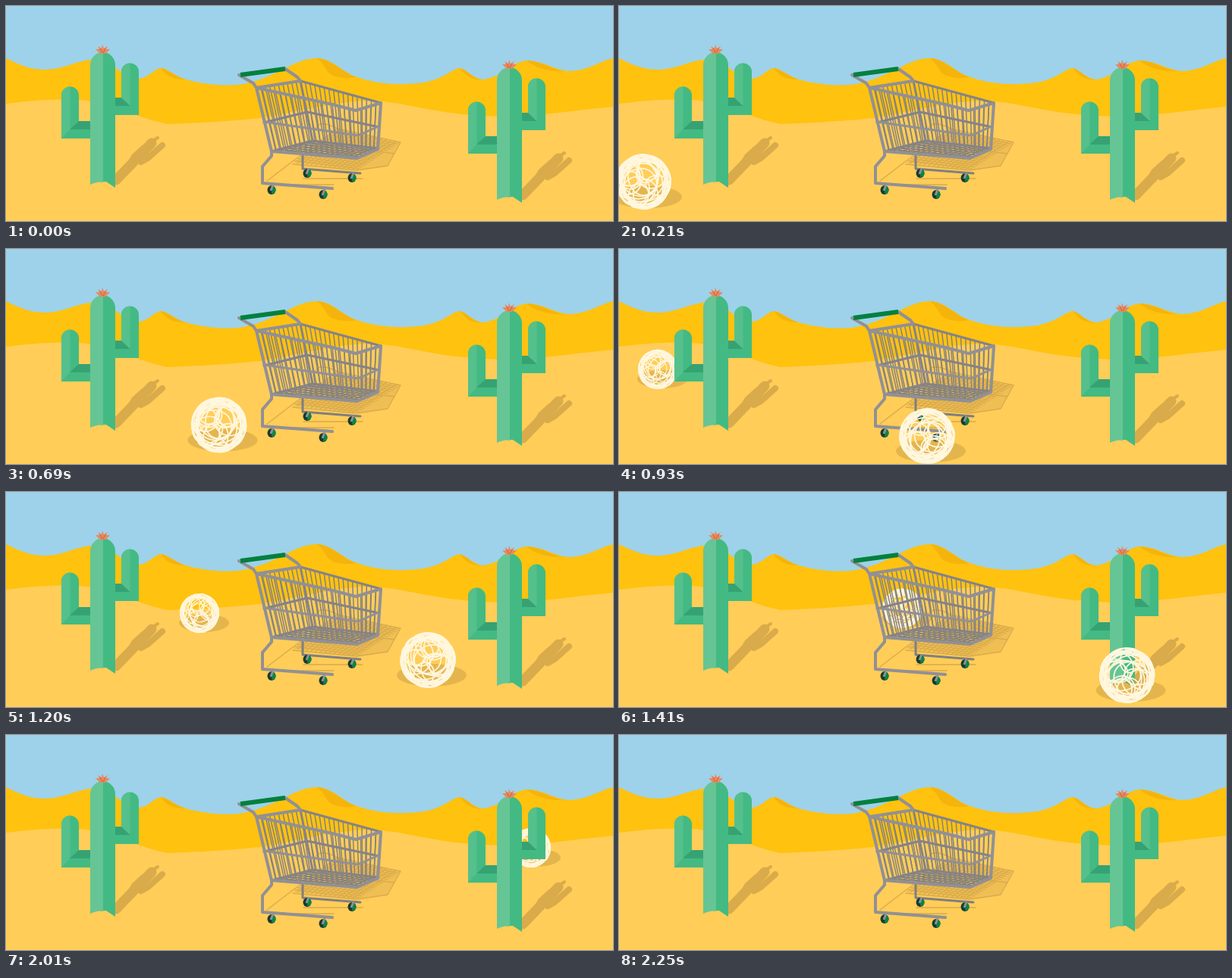
Animation, 800 px wide and 284 px high, one loop 2.34 s. Source, as an HTML page:

```html
<!DOCTYPE html>
<html lang="en">
<head>
<meta charset="utf-8">
<title>Desert cart</title>
<style>
  html, body { margin: 0; width: 100%; height: 100%; overflow: hidden; background: #ffcd58; }
  svg { display: block; width: 800px; height: 284px; }
  path { stroke-linejoin: round; }
  .line { fill: none; stroke: #919095; stroke-width: 4; stroke-linecap: round; }
  .shade { fill: #f5b40b; }
  .shadow { fill: none; stroke: #d9ab4b; stroke-linecap: round; stroke-linejoin: round; }
</style>
</head>
<body>
<svg viewBox="0 0 800 284">
  <defs>
    <g id="cactus">
      <g class="shadow">
        <path stroke-width="13" d="M145 230L192 181"/>
        <path stroke-width="8" d="M163 210L169 199L181 188M178 206L187 201L206 184"/>
        <path stroke-width="4" d="M194 178L200 174"/>
      </g>
      <path fill="#43ba83" d="M73 175V118a11.5 11.5 0 0 1 23 0V152H111V175ZM144 121H152V87a11.5 11.5 0 0 1 23 0V144H144Z"/>
      <path fill="#36a273" d="M84 163L96 152H111V163ZM144 121H152L164 132H144Z"/>
      <path fill="#55c08c" d="M73 175V118a11.5 11.5 0 0 1 11.5 -11.5V163L73 175ZM152 121V87a11.5 11.5 0 0 1 11.5 -11.5V132Z"/>
      <path fill="#43ba83" d="M127 61a17 17 0 0 1 17 17V240L132 232H127Z"/>
      <path fill="#66c594" d="M128 61a17 17 0 0 0 -17 17V236Q121 231 128 233Z"/>
      <path fill="#e8895f" d="M124 63L118 57L123 57L121 53L126 56L127 51L129 56L134 53L132 57L137 57L131 63Z"/>
      <path fill="none" stroke="#c8643f" d="M127 62L124 56M128 62L131 56"/>
    </g>
    <g id="scribble" fill="none" stroke="#fff7df" stroke-width="1.7"></g>
  </defs>

  <rect width="800" height="284" fill="#9dd2ea"/>
  <path fill="#ffc20e" d="M0 69C22 80 35 84 52 84C80 83 92 71 122 70C140 72 155 96 174 96C187 96 195 83 204 82C213 82 225 94 237 97C258 103 285 106 306 104C352 98 378 70 408 69C428 68 442 86 460 93C490 104 522 105 550 101C577 97 587 83 598 82C608 84 615 96 630 97C655 93 668 72 688 72C710 73 725 86 745 86C770 84 782 73 800 69V284H0Z"/>
  <path class="shade" d="M204 82C212 83 225 94 237 97C222 97 212 94 204 82ZM410 69C428 69 442 87 462 94C446 97 430 94 424 87C420 80 417 75 410 69ZM598 82C608 84 615 96 628 98C612 97 606 92 598 82ZM686 72C708 73 720 85 738 86C715 87 697 82 686 72Z"/>
  <path fill="#ffcd58" d="M0 129C45 123 90 121 120 127C155 135 180 150 213 156C270 154 305 151 335 148C390 138 440 125 482 125C530 127 565 145 660 146C710 145 755 137 800 133V284H0Z"/>

  <g id="small"></g>

  <path fill="#e3b450" fill-opacity=".55" d="M378 207L436 162L520 180L503 211L462 217Z"/>
  <g id="cartShadow" class="shadow" stroke-width="1.3">
    <path d="M344 231L374 208L436 162L520 180L503 211L462 217L378 209M412 182L512 195M392 228H470M348 236H432M408 162Q412 149 440 163"/>
  </g>
  <g id="cart">
    <path class="line" stroke-width="3" style="stroke:#807f80;stroke-width:3" d="M391 196V215L467 221"/>
    <g id="bars" fill="none" stroke="#85827f" stroke-width="1.5"></g>
    <path class="line" style="stroke:#858388;stroke-width:3" d="M388 99L494 128M388 99L404 178L490 188M350 192L404 178M340 154L397 140L492 160"/>
    <path class="line" d="M307 91L326 102L330 108L430 130L461 138L494 128L490 189L463 201L350 192L330 108L388 99L384 94L368 83"/>
    <path class="line" style="stroke-width:3" d="M340 153L464 171L491 159"/>
    <path class="line" d="M350 193V198L338 212V234L430 241"/>
    <path stroke="#04803f" stroke-width="6" d="M309 91L368 83"/>
    <g id="wheels"></g>
  </g>

  <use href="#cactus"/>
  <use href="#cactus" x="536" y="20"/>
  <g id="big"></g>
</svg>

<script>
const LOOP = 2340, STEP = 30;
const el = id => document.getElementById(id);
const mix = (a, b, k) => a + (b - a) * k;

// n parallel bars joining edge a-b to edge c-d
function bars(id, n, a, b, c, d) {
  let path = '';
  for (let i = 1; i < n; i++) {
    const k = i / n;
    path += `M${mix(a[0], b[0], k)} ${mix(a[1], b[1], k)}L${mix(c[0], d[0], k)} ${mix(c[1], d[1], k)}`;
  }
  el(id).innerHTML += `<path d="${path}"/>`;
}

const topLeft = [330, 108], topBack = [388, 99], topRight = [494, 128], topFront = [461, 138];
const lowLeft = [350, 192], lowBack = [404, 178], lowRight = [490, 188], lowFront = [463, 201];
bars('bars', 10, topLeft, topBack, lowLeft, lowBack);
bars('bars', 17, topBack, topRight, lowBack, lowRight);
bars('bars', 17, topLeft, topFront, lowLeft, lowFront);
bars('bars', 5, topFront, topRight, lowFront, lowRight);
bars('bars', 14, lowLeft, lowFront, lowBack, lowRight);
bars('bars', 6, lowLeft, lowBack, lowFront, lowRight);
bars('cartShadow', 17, [378, 207], [436, 162], [462, 217], [520, 180]);
bars('cartShadow', 14, [378, 207], [462, 217], [436, 162], [520, 180]);

el('wheels').innerHTML = [[350, 243], [418, 249], [397, 221], [456, 227]].map(([x, y]) =>
  `<g transform="translate(${x} ${y})">
    <ellipse rx="5.5" ry="6" fill="#173b30"/><path fill="#07864a" d="M1 -5A5 5 0 0 1 0 5Z"/>
    <path stroke="#919095" stroke-width="3" d="M2 -7L-1 1"/></g>`).join('');

let seed = 11;
const random = () => (seed = seed * 16807 % 2147483647) / 2147483647;
for (let i = 0; i < 27; i++) {
  const rx = 36 - 21 * random() ** 1.3, ry = rx * (0.72 + 0.28 * random());
  const turn = 360 * random(), shift = 36 - rx;
  el('scribble').innerHTML +=
    `<ellipse cx="${shift}" rx="${rx}" ry="${ry}" transform="rotate(${turn})"/>`;
}

// Keys are [time, x, y]
const balls = [
  { id: 'big', scale: 1, shadow: [5, 20, 46, 15],
    keys: [[0, -66, 232], [240, 47, 232], [420, 146, 229], [540, 203, 223], [880, 380, 247],
           [930, 406, 247], [1200, 556, 222], [1470, 702, 247], [1620, 783, 243], [1800, 880, 224]] },
  { id: 'small', scale: 0.71, shadow: [6, 13, 33, 12],
    keys: [[780, -62, 158], [930, 51, 159], [1080, 170, 157], [1200, 255, 160], [1400, 368, 154],
           [1620, 484, 148], [1800, 580, 145], [2010, 692, 149], [2160, 785, 156], [2250, 845, 158]] }
];

for (const { id, scale, shadow: [x, y, rx, ry] } of balls) {
  el(id).innerHTML =
    `<ellipse cx="${x}" cy="${y}" rx="${rx}" ry="${ry}" fill="#c99b42" fill-opacity=".48"/>
     <g class="roll"><use href="#scribble" transform="scale(${scale})"/></g>`;
}

// Smooth curve through the keys
function valueAt(keys, t, axis) {
  const i = Math.max(0, keys.findIndex(k => k[0] > t) - 1);
  const a = keys[i], b = keys[i + 1], span = b[0] - a[0], u = (t - a[0]) / span;
  const slope = j => {
    const p = keys[Math.max(0, j - 1)], q = keys[Math.min(keys.length - 1, j + 1)];
    return (q[axis] - p[axis]) / (q[0] - p[0]) * span;
  };
  const ease = u * u * (3 - 2 * u);
  return mix(a[axis], b[axis], ease) + u * (1 - u) * ((1 - u) * slope(i) - u * slope(i + 1));
}

function draw(now) {
  const t = Math.min(LOOP - 90, Math.floor(now % LOOP / STEP) * STEP);
  for (const { id, scale, keys } of balls) {
    const ball = el(id), visible = t >= keys[0][0] && t < keys.at(-1)[0];
    ball.style.display = visible ? '' : 'none';
    if (!visible) continue;
    const x = valueAt(keys, t, 1), y = valueAt(keys, t, 2);
    ball.setAttribute('transform', `translate(${x} ${y})`);
    ball.querySelector('.roll').setAttribute('transform', `rotate(${x / (37 * scale) * 180 / Math.PI})`);
  }
}

const start = performance.now();
function tick() {
  draw(performance.now() - start);
  requestAnimationFrame(tick);
}
tick();
</script>
</body>
</html>
```
